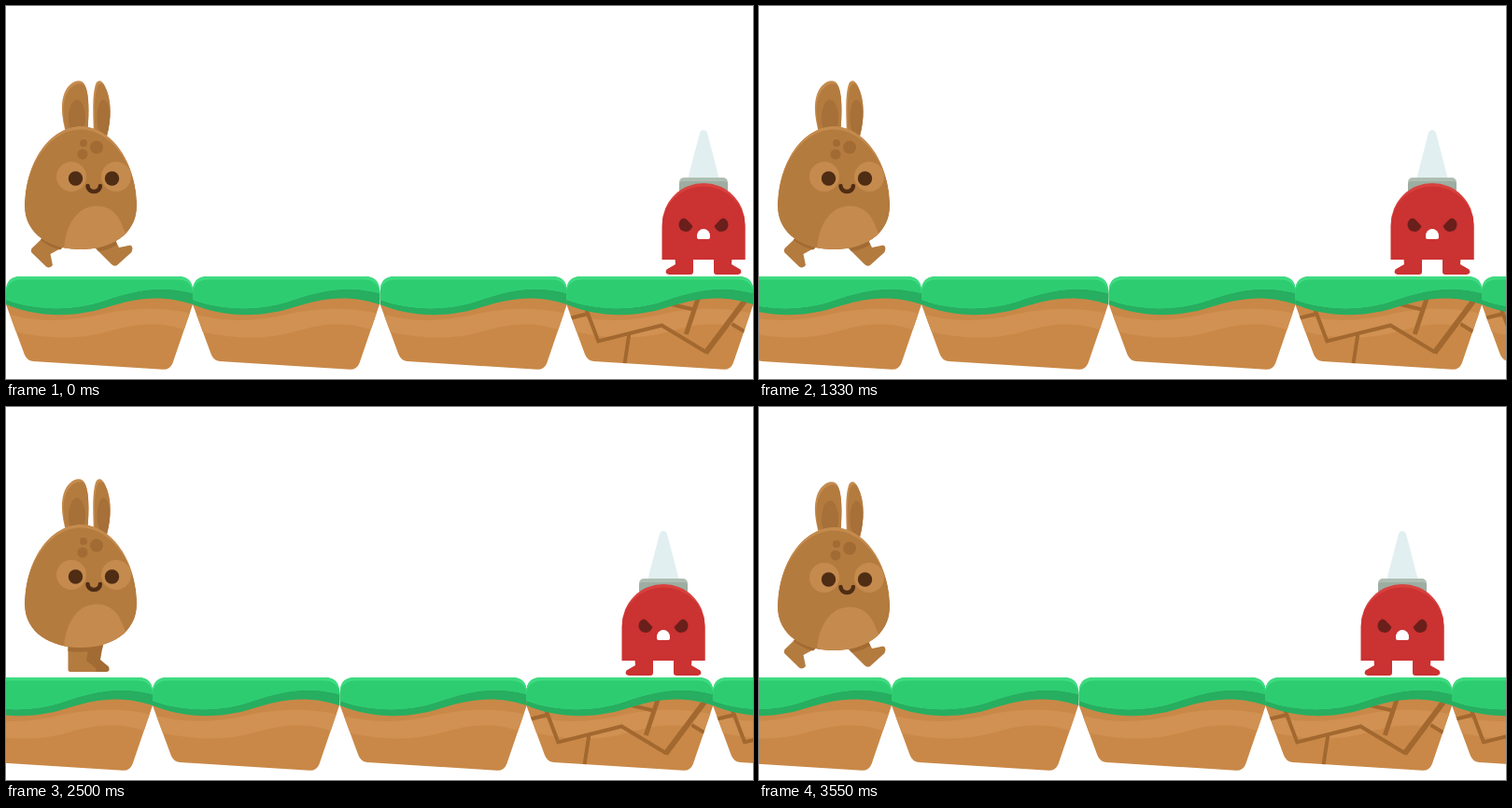
These frames come from a looping animation (800 by 400 pixels, 3620 ms). An HTML page without scripts:

```html
<!DOCTYPE html>
<html lang="en">
<head>
<meta charset="utf-8">
<title>Running rabbit</title>
<style>
  @property --run { syntax: "<number>"; inherits: true; initial-value: 1; }

  html, body { margin: 0; width: 100%; height: 100%; overflow: hidden; background: #fff; }
  svg { display: block; width: 800px; height: 400px; }

  .world { animation: scroll 3620ms infinite; }
  .rabbit { animation: stride 3620ms step-end infinite; }
  .torso { transform: translateY(calc(var(--run) * 3px)); }
  .leap { opacity: var(--run); }
  .stand { opacity: calc(1 - var(--run)); }

  .fur { fill: #b47b3f; }
  .light { fill: #c58b4e; }
  .dark { fill: #a26b33; }
  .eye { fill: #4f2c14; }
  .red { fill: #cb3232; }

  /* One pixel per step, the steps getting slower: 20, 30, 40, 50, 60, 70 ms */
  @keyframes scroll {
    0% { transform: translateX(0); animation-timing-function: step-end; }
    .552% { transform: translateX(-1px); animation-timing-function: steps(3); }
    3.038% { transform: translateX(-4px); animation-timing-function: steps(3); }
    6.353% { transform: translateX(-7px); animation-timing-function: steps(4); }
    11.878% { transform: translateX(-11px); animation-timing-function: steps(17); }
    40.055% { transform: translateX(-28px); animation-timing-function: steps(31); }
    100% { transform: translateX(-59px); }
  }
  @keyframes stride {
    0%, 11.87%, 23.48%, 35.08%, 47.79%, 59.39%, 70.99%, 82.59%, 94.19%, 100% { --run: 1; }
    6.35%, 18.5%, 30.11%, 41.98%, 53.59%, 65.19%, 76.79%, 88.39% { --run: 0; }
  }
</style>
</head>
<body>
<svg viewBox="0 0 800 400" xmlns="http://www.w3.org/2000/svg">
  <defs>
    <path id="soil" d="M0 306V320L19.500 373Q22 380 29 381L168 389.800Q175.500 390.300 178.500 383L200 320V306Z"/>
    <clipPath id="inSoil"><use href="#soil"/></clipPath>

    <g id="dirt">
      <use href="#soil" fill="#c98847"/>
      <path clip-path="url(#inSoil)" fill="#d09152"
        d="M0 330C35 340 70 338 100 331S165 322 200 330V351C170 338 145 339 110 349S40 357 0 347Z"/>
    </g>
    <g id="grass">
      <path fill="#27ae60" d="M0 306V320C30 333 70 335 105 324S165 309 200 320V306Q200 290 184 290H16Q0 290 0 306Z"/>
      <path fill="#3ddc80" d="M0 306V315C30 326 70 328 105 316S165 299 200 308V306Q200 290 184 290H16Q0 290 0 306Z"/>
      <path fill="#2ecc71" d="M0 308V315C30 326 70 328 105 316S165 299 200 308Q199 294 184 293.500H16Q1 294 0 308Z"/>
    </g>
    <g id="plain"><use href="#dirt"/><use href="#grass"/></g>
    <g id="cracked">
      <use href="#dirt"/>
      <g clip-path="url(#inSoil)" fill="none" stroke="#a2682f" stroke-width="4">
        <path d="M3 335L23 330M21 325L34 359.500L102 342.500L150 371.500M67 352L62 385M104 318L138 326M177 341L192 350"/>
        <path stroke-width="5" d="M142 310L128 352"/>
        <path stroke-width="6" d="M149 372L194 312"/>
      </g>
      <use href="#grass"/>
    </g>

    <g id="enemyHalf">
      <path class="red" d="M716.500 271H736V285Q736 288 733 288H710Q705 287 707.500 282.500L717 277Z"/>
      <path fill="#6a1f1b" d="M722 230Q725 225.500 729 229L735.500 236Q733 242 728 242Q720.500 241 720.500 234.500Q720.500 232 722 230Z"/>
    </g>

    <path id="egg" d="M20 211C20 166 46 126 80 126S140 166 140 211C140 243 111 258 80 258S20 243 20 211Z"/>
    <clipPath id="inEgg"><use href="#egg"/></clipPath>
    <path id="earL" d="M65 136C60 119 58 104 62 92C66 80 76 74.500 82 78.500C90 85 89 114 87 136Z"/>
    <path id="earR" d="M94 136C93 110 92.500 92 96 81C98 75.500 103 76 106 83C112 96 114 112 108 137Z"/>
    <clipPath id="inEars"><use href="#earL"/><use href="#earR"/></clipPath>
  </defs>

  <g class="world">
    <use href="#plain"/>
    <use href="#plain" x="200"/>
    <use href="#plain" x="400.700"/>
    <use href="#cracked" x="600.300"/>
    <use href="#cracked" x="800"/>

    <g>
      <path fill="#e1eff0" d="M743 136Q744 133 747 133T751 136L764 186H730Z"/>
      <rect x="721" y="184" width="52" height="18" rx="5" fill="#aebdb2"/>
      <path fill="#9dada1" d="M721 198V192Q721 188 725 188H769Q773 188 773 192V198Z"/>
      <path fill="#d8413d" d="M702.700 272V234a44.400 44 0 0 1 88.800 0V272Z"/>
      <path class="red" d="M702.700 272V236a44.400 42.500 0 0 1 88.800 0V272Z"/>
      <use href="#enemyHalf"/>
      <use href="#enemyHalf" transform="translate(1494) scale(-1 1)"/>
      <path fill="#fff" d="M740 246.500a7 7.500 0 0 1 14 0v1.500q0 2-2 2h-10q-2 0-2-2z"/>
    </g>
  </g>

  <g class="rabbit">
    <g class="leap">
      <path class="fur" d="M40 248L27.500 260Q26 263 28 265L43 279.500Q47 282 50 278L47.500 266L64 257Z"/>
      <path class="fur" d="M94 258L113 277Q116 280 119 278L134.500 264Q137 258 133 256.500L121 259L116 249Z"/>
      <path class="dark" d="M38 249L64 256L58 261.500Q45 258 37 251ZM95 258L117 250L119 256Q109 262 99 263Z"/>
    </g>
    <g class="stand">
      <path class="dark" d="M84 254H104L101 271L110 278.500Q112 284 107 284H90L85 272Z"/>
      <path class="fur" d="M66.500 254H89L86 272L96 280Q98 284 95 284H69Q66.500 284 66.500 281.500Z"/>
      <path class="dark" d="M66.500 255H104L103 260Q85 264 66.500 262Z"/>
    </g>

    <g class="torso">
      <g clip-path="url(#inEars)">
        <path class="light" d="M55 70H120V140H55Z"/>
        <use href="#earL" class="fur" x="1.500" y="3"/>
        <use href="#earR" class="fur" x="1.500" y="3"/>
        <g fill="#a67038">
          <ellipse cx="76" cy="117" rx="9" ry="19.500"/>
          <ellipse cx="104.500" cy="117" rx="7" ry="19.500"/>
        </g>
      </g>
      <g clip-path="url(#inEgg)">
        <use href="#egg" class="light"/>
        <path class="fur" d="M20 211C20 170 46 129.500 80 129.500S140 170 140 211V260H20Z"/>
        <path class="light" d="M62 260C63 233 76 211.500 97 211.500C113 211.500 122 222 127 239L140 260Z"/>
        <circle class="light" cx="70" cy="180" r="16"/>
        <circle class="light" cx="118" cy="180" r="16"/>
      </g>
      <g class="dark">
        <circle cx="83" cy="144" r="4"/>
        <circle cx="97" cy="148.500" r="7"/>
        <circle cx="82" cy="156" r="5.500"/>
      </g>
      <g class="eye">
        <circle cx="74.500" cy="182" r="7.700"/>
        <circle cx="113.500" cy="182" r="7.700"/>
      </g>
      <path d="M87.500 190a6.700 6 0 0 0 13.400 0" fill="none" stroke="#4f2c14" stroke-width="4.500" stroke-linecap="round"/>
    </g>
  </g>
</svg>
</body>
</html>
```
